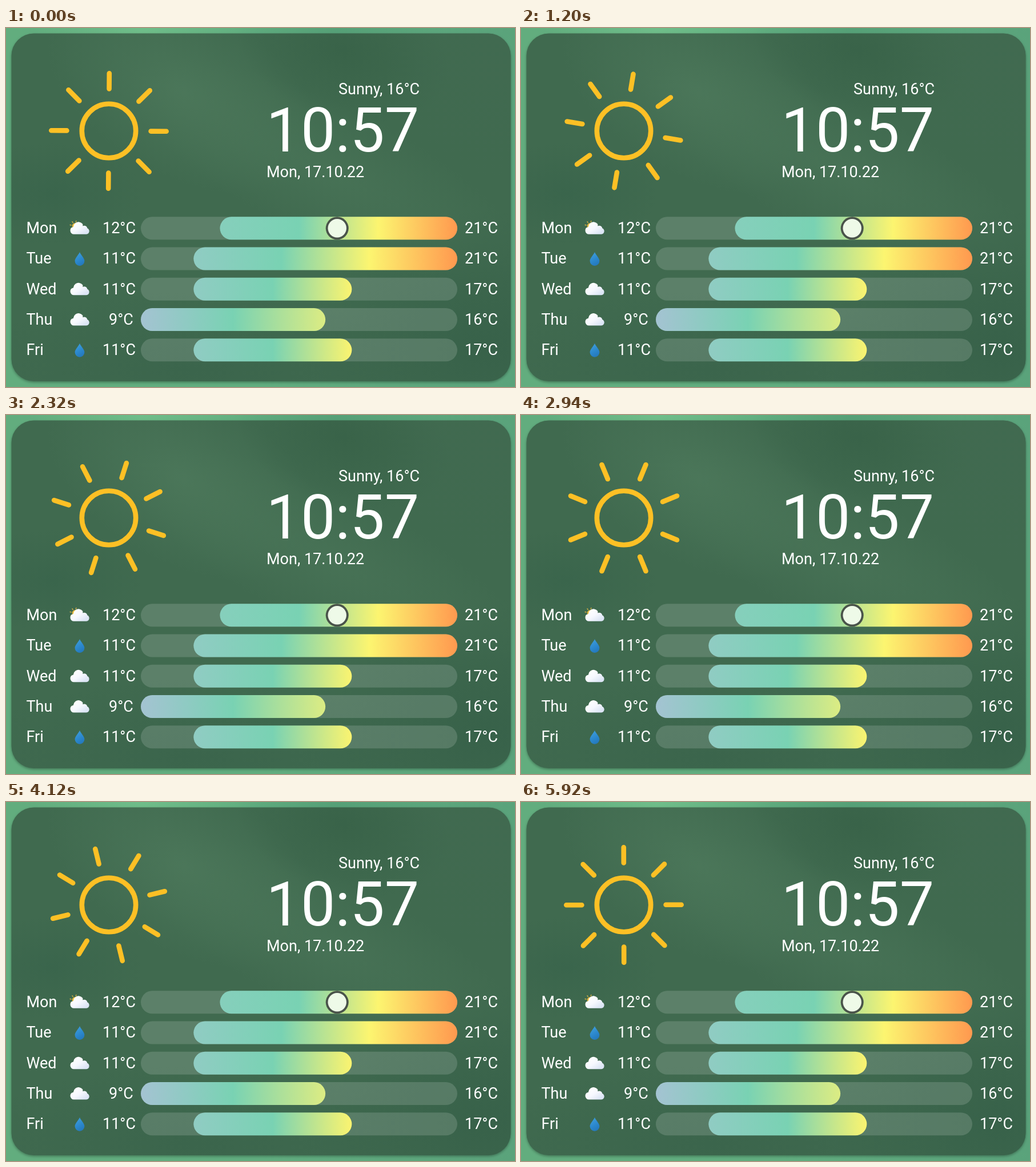
Recreate the animation shown at these times as an HTML page with a canvas. Size 891 by 628 pixels, loop 5.94 s.

```html
<!DOCTYPE html>
<html lang="en">
<head>
<meta charset="utf-8">
<title>Weather card</title>
<style>
html, body { margin: 0; width: 100%; height: 100%; overflow: hidden; background: #60ab7f; }
canvas { display: block; width: 891px; height: 628px; }
</style>
</head>
<body>
<canvas id="stage" width="891" height="628"></canvas>
<script>
const W = 891, H = 628, LOOP = 5940;
const ctx = document.getElementById('stage').getContext('2d');
const backdrop = document.createElement('canvas');
backdrop.width = W;
backdrop.height = H;
const g = backdrop.getContext('2d');

const BAR = { x: 236, w: 554, h: 40, low: 9, high: 21 };
const TEAL = '#79d2b3', YELLOW = '#fcf570', ORANGE = '#ff994f';
const rows = [
  { day: 'Mon', icon: 'partly', min: 12, max: 21, colors: ['#86cfbc', TEAL, YELLOW, ORANGE] },
  { day: 'Tue', icon: 'rain', min: 11, max: 21, colors: ['#90ccc3', TEAL, YELLOW, ORANGE] },
  { day: 'Wed', icon: 'cloud', min: 11, max: 17, colors: ['#90ccc3', TEAL, '#fbf470'] },
  { day: 'Thu', icon: 'cloud', min: 9, max: 16, colors: ['#a4c3d2', TEAL, '#dcec83'] },
  { day: 'Fri', icon: 'rain', min: 11, max: 17, colors: ['#90ccc3', TEAL, '#fbf470'] }
];

const tempX = t => BAR.x + (t - BAR.low) / (BAR.high - BAR.low) * BAR.w;

function pill(x, y, w, h, r, fill) {
  g.fillStyle = fill;
  g.beginPath();
  g.roundRect(x, y, w, h, r);
  g.fill();
}

function disc(x, y, r, fill) {
  g.fillStyle = fill;
  g.beginPath();
  g.arc(x, y, r, 0, Math.PI * 2);
  g.fill();
}

function glow(x, y, rx, ry, turn, rgb, alpha) {
  g.save();
  g.translate(x, y);
  g.rotate(turn);
  g.scale(rx, ry);
  const fade = g.createRadialGradient(0, 0, 0, 0, 0, 1);
  fade.addColorStop(0, `rgba(${rgb},${alpha})`);
  fade.addColorStop(0.5, `rgba(${rgb},${alpha * 0.5})`);
  fade.addColorStop(1, `rgba(${rgb},0)`);
  disc(0, 0, 1, fade);
  g.restore();
}

function ramp(x0, y0, x1, y1, colors) {
  const fill = g.createLinearGradient(x0, y0, x1, y1);
  colors.forEach((c, i) => fill.addColorStop(i / (colors.length - 1), c));
  return fill;
}

function label(text, x, y, size = 27) {
  g.font = `400 ${size}px Roboto, sans-serif`;
  g.fillStyle = '#fff';
  g.fillText(text, x, y);
}

function drawBackground() {
  g.fillStyle = ramp(0, 0, W, 0, ['#62ad7e', '#60ad7f', '#5aa37b']);
  g.fillRect(0, 0, W, H);
  glow(240, 0, 200, 160, 0, '120,200,145', 0.6);
  glow(580, 0, 180, 140, 0, '76,150,112', 0.5);

  g.save();
  g.shadowColor = 'rgba(0,0,0,0.3)';
  g.shadowBlur = 4;
  g.shadowOffsetY = 2;
  pill(9.5, 9.5, 874, 608.5, 39, '#406a4f');
  g.restore();

  g.save();
  g.beginPath();
  g.roundRect(9.5, 9.5, 874, 608.5, 39);
  g.clip();
  glow(310, 110, 260, 150, 0.5, '80,124,94', 0.65);
  glow(560, 250, 380, 120, 0.45, '78,122,92', 0.5);
  glow(590, 40, 190, 120, 0.3, '54,96,70', 0.7);
  glow(850, 60, 180, 200, 0, '66,106,82', 0.4);
  glow(80, 290, 160, 90, 0, '54,98,74', 0.6);
  glow(840, 560, 320, 240, 0, '50,92,70', 0.6);
  glow(330, 600, 400, 140, 0, '54,96,73', 0.5);
  g.restore();
}

function cloud(x, y) {
  g.fillStyle = ramp(x - 8, y - 10, x + 6, y + 11, ['#ffffff', '#f6f8fe', '#dce5f5']);
  g.beginPath();
  g.arc(x - 10, y + 4, 6.5, Math.PI / 2, Math.PI * 1.45);
  g.arc(x - 2, y - 2, 9, Math.PI * 1.05, Math.PI * 1.8);
  g.arc(x + 8, y + 1, 5.5, Math.PI * 1.35, Math.PI * 1.9);
  g.arc(x + 11.2, y + 5, 5.5, Math.PI * 1.6, Math.PI / 2);
  g.closePath();
  g.fill();
}

function smallSun(x, y) {
  disc(x, y, 5.2, '#e6b83d');
  g.strokeStyle = '#dcb343';
  g.lineWidth = 1.4;
  g.lineCap = 'round';
  for (let i = 0; i < 8; i++) {
    const a = i * Math.PI / 4 + 0.2, c = Math.cos(a), s = Math.sin(a);
    g.beginPath();
    g.moveTo(x + 7 * c, y + 7 * s);
    g.lineTo(x + 9 * c, y + 9 * s);
    g.stroke();
  }
}

function drop(x, y) {
  g.fillStyle = ramp(x - 6, y - 8, x + 6, y + 12, ['#3b9ad9', '#2b87cc', '#2375b8']);
  g.beginPath();
  g.moveTo(x, y - 12);
  g.bezierCurveTo(x + 2, y - 7, x + 8.4, y - 1.5, x + 8.4, y + 3.5);
  g.arc(x, y + 3.5, 8.4, 0, Math.PI);
  g.bezierCurveTo(x - 8.4, y - 1.5, x - 2, y - 7, x, y - 12);
  g.fill();
}

const icons = {
  cloud: y => cloud(129, y),
  partly: y => { smallSun(121, y - 4); cloud(129, y); },
  rain: y => drop(129, y + 0.5)
};

function drawRow(row, i) {
  const mid = 350.3 + i * 53.25, top = mid - BAR.h / 2, base = mid + 8.7;
  const x0 = tempX(row.min), x1 = tempX(row.max);
  label(row.day, 35.5, base);
  icons[row.icon](mid);
  label(row.min + '°C', row.min < 10 ? 180 : 169, base);
  pill(BAR.x, top, BAR.w, BAR.h, 20, 'rgba(255,255,255,0.145)');
  pill(x0, top, x1 - x0, BAR.h, 20, ramp(x0, 0, x1, 0, row.colors));
  label(row.max + '°C', 803, base);
}

function drawStatic() {
  drawBackground();
  label('Sunny, 16°C', 582, 116);
  label('10:57', 455.5, 216, 107.5);
  label('Mon, 17.10.22', 456, 261);
  rows.forEach(drawRow);
  disc(579.7, 350.3, 20, '#49534a');
  disc(579.7, 350.3, 16.2, '#eefae8');
}

function drawSun(degrees) {
  ctx.save();
  ctx.translate(180, 180);
  ctx.strokeStyle = '#fdc025';
  ctx.lineWidth = 8.6;
  ctx.lineCap = 'round';
  ctx.beginPath();
  ctx.arc(0, 0, 47.2, 0, Math.PI * 2);
  ctx.stroke();
  ctx.rotate(degrees * Math.PI / 180);
  for (let i = 0; i < 8; i++) {
    ctx.beginPath();
    ctx.moveTo(0, -73.6);
    ctx.lineTo(0, -100.7);
    ctx.stroke();
    ctx.rotate(Math.PI / 4);
  }
  ctx.restore();
}

function frame() {
  const t = performance.now() % LOOP;
  ctx.drawImage(backdrop, 0, 0);
  drawSun(0.45 + t * 45 / 6000);
  requestAnimationFrame(frame);
}

drawStatic();
frame();
</script>
</body>
</html>
```
